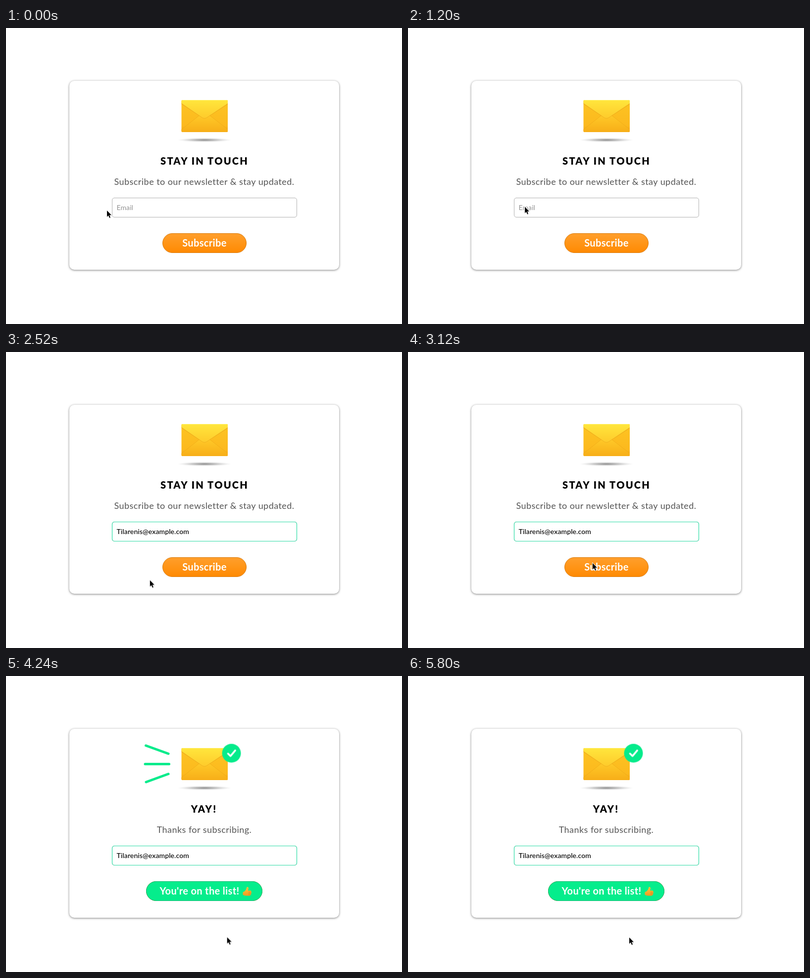
Write an HTML page that moves like this. It is 800 px wide and 600 px high and loops after 5820 ms.

```html
<!DOCTYPE html>
<html lang="en">
<head>
<meta charset="utf-8">
<title>Newsletter signup</title>
<style>
html, body { margin: 0; width: 100%; height: 100%; overflow: hidden; background: #fff; }
.card {
  position: absolute; left: 128px; top: 107px; width: 545px; height: 383px;
  border-radius: 10px; background: #fff;
  box-shadow: 0 1px 4px rgba(0, 0, 0, .5);
}
svg { position: absolute; left: 0; top: 0; display: block; }
text { font-family: Lato, "Open Sans", sans-serif; }
.mid { text-anchor: middle; }
.title { font-size: 20px; font-weight: 900; letter-spacing: 2.2px; }
.lead { font-size: 18px; letter-spacing: .45px; fill: #555; }
.label { font-size: 20px; font-weight: 700; letter-spacing: .35px; fill: #fff; }
.input { font-size: 14px; letter-spacing: .1px; }
.hint { fill: #929292; }
.typed { font-weight: 500; }

/* Every part shares one 5.82 s loop */
.cursor, .pill, .tick, .ray, .show, .ask, .cta, .thanks, .empty, .filled, .rays {
  animation: 5.82s linear infinite;
}
.cursor { animation-name: point; animation-timing-function: ease-in-out; }
.pill { x: 316.5px; width: 169px; animation-name: widen; }
.tick { animation-name: rise; }
.ray {
  fill: none; stroke: #05eb8b; stroke-width: 5; stroke-linecap: round;
  animation-name: trace;
}
.show { animation-name: show; }
.rays { animation-name: burst; }
.ask { animation-name: ask; }
.cta { animation-name: cta; }
.thanks { animation-name: thanks; }
.empty { animation-name: empty; }
.filled { animation-name: filled; }

@keyframes point {
  0% { transform: translate(204px, 370px); }
  9.62%, 22.34% { transform: translate(236px, 362.5px); }
  35.05%, 42.61% { transform: translate(290px, 463px); }
  52.92% { transform: translate(373px, 428px); }
  60.14% { transform: translate(373px, 428px); animation-timing-function: ease-in; }
  66.67% { transform: translate(409px, 484.5px); animation-timing-function: ease-out; }
  73.37%, 100% { transform: translate(447px, 530px); }
}
@keyframes widen {
  0%, 64.6% { x: 316.5px; width: 169px; animation-timing-function: ease-in-out; }
  70.79%, 100% { x: 283.5px; width: 234px; }
}
@keyframes rise {
  0%, 64.6% { transform: translate(455.5px, 275px) scale(0); animation-timing-function: ease-in-out; }
  70.79%, 100% { transform: translate(455.5px, 156.5px) scale(1); }
}
@keyframes trace {
  0%, 64.95% { stroke-dasharray: 0 200; stroke-dashoffset: 0; animation-timing-function: ease-in-out; }
  70.79%, 73.88% { stroke-dasharray: 100 200; stroke-dashoffset: 0; animation-timing-function: ease-in-out; }
  80.41%, 100% { stroke-dasharray: 100 200; stroke-dashoffset: -100; }
}
@keyframes show {
  0%, 64.6% { opacity: 0; animation-timing-function: ease-in-out; }
  70.79%, 100% { opacity: 1; }
}
@keyframes burst {
  0%, 64.6% { opacity: 0; animation-timing-function: ease-in-out; }
  70.79%, 73.88% { opacity: 1; animation-timing-function: ease-in-out; }
  80.41%, 100% { opacity: 0; }
}
@keyframes ask { 0%, 63.92% { opacity: 1; } 67.01%, 100% { opacity: 0; } }
@keyframes cta { 0%, 66.32% { opacity: 1; } 68.38%, 100% { opacity: 0; } }
@keyframes thanks { 0%, 67.35% { opacity: 0; } 70.79%, 100% { opacity: 1; } }
@keyframes empty { 0%, 36.94% { opacity: 1; } 42.96%, 100% { opacity: 0; } }
@keyframes filled { 0%, 36.94% { opacity: 0; } 42.96%, 100% { opacity: 1; } }
</style>
</head>
<body>
<div class="card"></div>
<svg width="800" height="600" viewBox="0 0 800 600">
  <defs>
    <linearGradient id="body" x2="0" y2="1">
      <stop offset="0" stop-color="#fdc422"/>
      <stop offset=".8" stop-color="#fcb91e"/>
      <stop offset="1" stop-color="#f3a51a"/>
    </linearGradient>
    <linearGradient id="front" x2="0" y2="1">
      <stop offset="0" stop-color="#ffc928"/>
      <stop offset="1" stop-color="#f7ae18"/>
    </linearGradient>
    <linearGradient id="flap" x2="0" y2="1">
      <stop offset="0" stop-color="#ffe63c"/>
      <stop offset="1" stop-color="#fecb2b"/>
    </linearGradient>
    <linearGradient id="orange" x2="0" y2="1">
      <stop offset="0" stop-color="#ff9f2c"/>
      <stop offset="1" stop-color="#ff8a02"/>
    </linearGradient>
    <radialGradient id="shade">
      <stop offset="0" stop-color="#777" stop-opacity=".9"/>
      <stop offset=".5" stop-color="#999" stop-opacity=".5"/>
      <stop offset="1" stop-color="#ccc" stop-opacity="0"/>
    </radialGradient>
    <linearGradient id="hand" x2="0" y2="1">
      <stop offset="0" stop-color="#ffc83a"/>
      <stop offset="1" stop-color="#f09a22"/>
    </linearGradient>
    <clipPath id="paper"><rect x="354.5" y="146" width="93.5" height="65" rx="2"/></clipPath>
  </defs>

  <!-- Envelope -->
  <ellipse cx="401" cy="227" rx="55" ry="4.5" fill="url(#shade)"/>
  <g clip-path="url(#paper)">
    <rect x="354" y="146" width="95" height="65" fill="url(#body)"/>
    <path d="M354 206L391 177H411L449 206V211H354Z" fill="url(#front)"/>
    <path d="M354 206L391 177M411 177L449 206" fill="none" stroke="#e9a416" stroke-width=".8" opacity=".7"/>
    <path d="M354 154L396 182Q401 185.500 406 182L449 154V151H354Z" fill="#e6a31a" opacity=".55"/>
    <path d="M354 146H449V152L406 181Q401 184.500 396 181L354 152Z" fill="url(#flap)"/>
    <rect x="354" y="146" width="95" height="1.500" fill="#fff060" opacity=".6"/>
  </g>

  <g class="rays">
    <path class="ray" pathLength="100" d="M328 157.500L282.500 141"/>
    <path class="ray" pathLength="100" d="M329.500 178.500H281"/>
    <path class="ray" pathLength="100" d="M328 198.500L283 215"/>
  </g>

  <!-- Headings -->
  <g class="ask mid">
    <text class="title" x="401" y="277">STAY IN TOUCH</text>
    <text class="lead" x="400.500" y="318">Subscribe to our newsletter &amp; stay updated.</text>
  </g>
  <g class="thanks mid">
    <text class="title" x="400" y="277">YAY!</text>
    <text class="lead" x="400.500" y="318">Thanks for subscribing.</text>
  </g>

  <!-- Field -->
  <rect x="214.500" y="344.500" width="373" height="39" rx="4.500" fill="#fff" stroke="#b2b2b2"/>
  <text class="input hint empty" x="223.500" y="369">Email</text>
  <g class="filled">
    <rect x="214.500" y="344.500" width="373" height="39" rx="4.500" fill="none" stroke="#2fdca6" stroke-width="1.200"/>
    <text class="input typed" x="223.500" y="369">Tilarenis@example.com</text>
  </g>

  <!-- Button -->
  <rect class="pill" y="416.500" height="39" rx="19.500" fill="url(#orange)" stroke="#d97c10"/>
  <g class="show">
    <rect class="pill" y="416.500" height="39" rx="19.500" fill="#05ed8c" stroke="#14b873"/>
    <rect x="475" y="424.500" width="26" height="26" fill="#05ed8c"/>
    <path d="M478.500 438Q483 437 485.500 431.500L486.500 428Q489.500 426.500 490 430.500L489 435H494Q496 435.500 495.500 437.500Q496.500 439 495.300 440.500Q495.800 442 494.500 443Q494 445.500 491.500 445.500H485Q482 445.500 478.500 443.500Z" fill="url(#hand)"/>
    <path d="M489.500 437.800H495M489.500 440.500H495M489.500 443.200H494" stroke="#d07a1c" stroke-width=".8"/>
  </g>
  <text class="label cta mid" x="401" y="443">Subscribe</text>
  <text class="label thanks mid" x="391" y="443">You're on the list!</text>

  <g class="show">
    <g class="tick">
      <circle r="19" fill="#05eb8b"/>
      <path d="M-7 .8L-2 5.800L7.500 -5.500" fill="none" stroke="#fff" stroke-width="3.600" stroke-linecap="round" stroke-linejoin="round"/>
    </g>
  </g>

  <g class="cursor">
    <path d="M0 1.500V14L3 11.200L5.200 16.200L7.400 15.200L5.300 10.400H9.200Z" fill="#000" opacity=".25"/>
    <path d="M0 0V12.700L2.900 10L5 14.900L7 14L4.900 9.200H9Z" stroke="#fff" stroke-width="1.600" paint-order="stroke"/>
  </g>
</svg>
</body>
</html>
```
